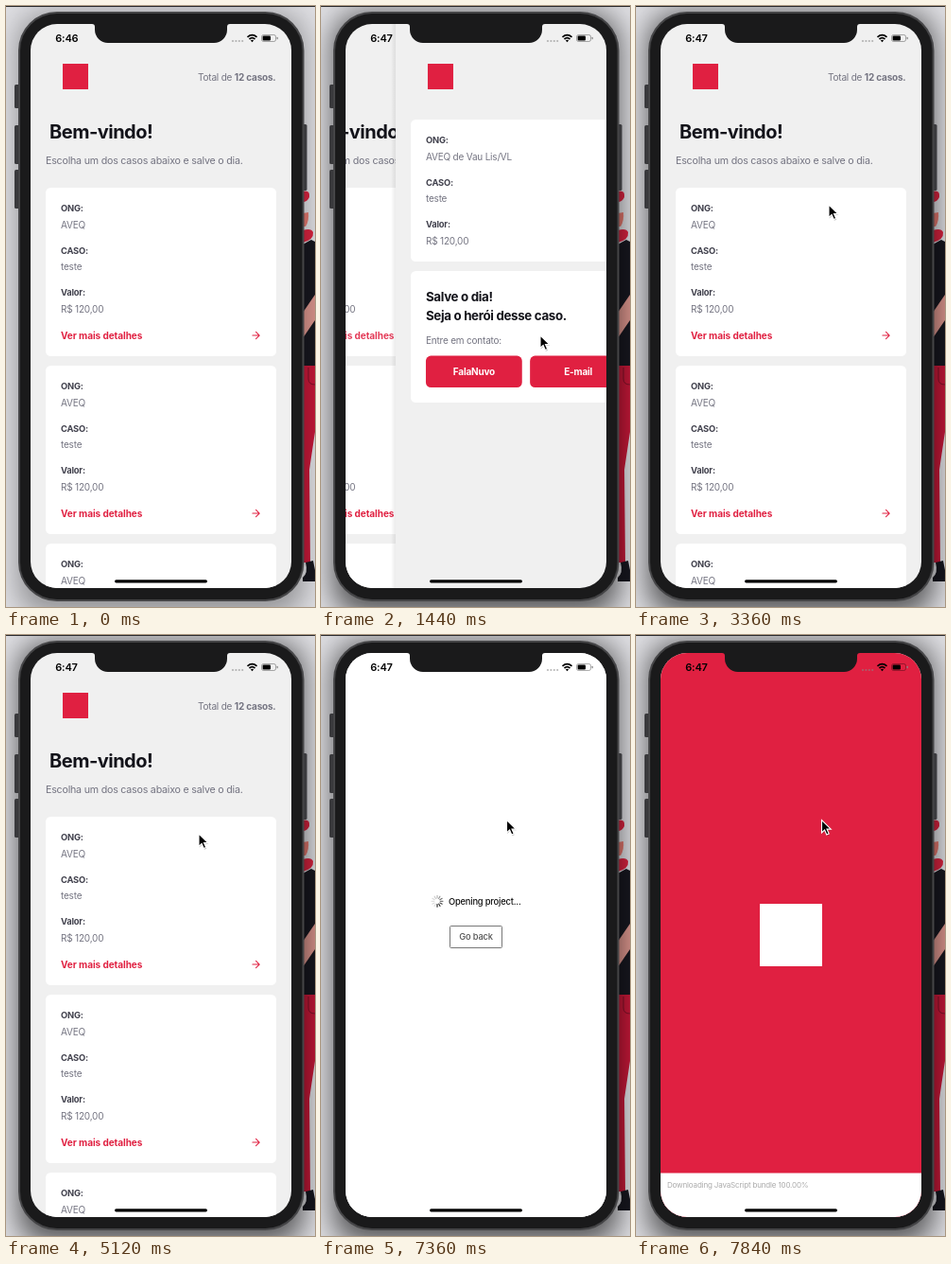
These frames come from a looping animation (327x635 px, 8000 ms). An HTML page:

```html
<!DOCTYPE html>
<html lang="pt-BR">
<head>
<meta charset="utf-8">
<title>Casos</title>
<style>
  html, body { margin: 0; width: 100%; height: 100%; overflow: hidden; background: #dedee2; }
  svg { display: block; }
  text { font-family: Inter, "Liberation Sans", sans-serif; letter-spacing: -.02em; }
  .b { font-weight: 700; }
  .big { letter-spacing: -.025em; }
  .link { letter-spacing: -.005em; }
  .line { fill: none; stroke: #e02041; stroke-linecap: round; stroke-linejoin: round; stroke-width: 2; }
</style>
</head>
<body>
<svg id="stage" width="327" height="635" viewBox="0 0 327 635"></svg>
<script>
const RED = '#e02041', GREY = '#737380', INK = '#41414d', DARK = '#13131a', BG = '#f0f0f0';
const ARROW = 'M5 12h14M12 5l7 7-7 7';
const W = 276, LOOP = 8000, STEP = 160;

const rect = (x, y, w, h, fill, r = 0, more = '') =>
  `<rect x="${x}" y="${y}" width="${w}" height="${h}" rx="${r}" fill="${fill}" ${more}/>`;
const text = (x, y, size, fill, str, more = '') =>
  `<text x="${x}" y="${y}" font-size="${size}" fill="${fill}" ${more}>${str}</text>`;
const bold = (x, y, size, fill, str, kind = '', more = '') =>
  text(x, y, size, fill, str, `class="b ${kind}" ${more}`);
const MID = 'text-anchor="middle"';

const fields = (y, ngo) => [['ONG:', ngo], ['CASO:', 'teste'], ['Valor:', 'R$ 120,00']]
  .map(([label, value], i) =>
    bold(58, y + 25 + i * 44.5, 9.33, INK, label) +
    text(58, y + 42.5 + i * 44.5, 10, GREY, value)).join('');

const card = (y, id) => rect(42, y, 244, 178, '#fff', 5.3) + fields(y, 'AVEQ') +
  `<g id="${id}">` + bold(58, y + 159.5, 10, RED, 'Ver mais detalhes', 'link') +
  `<path class="line" d="${ARROW}" transform="translate(258.3 ${y + 149.8}) scale(.52)"/></g>`;

const logo = rect(60, 61, 27, 27, RED);

const home = rect(26, 19, W, 596, BG) + logo +
  text(285.5, 78.5, 10, GREY, 'Total de <tspan class="b">12 casos.</tspan>', 'text-anchor="end"') +
  bold(46, 139.5, 20, DARK, 'Bem-vindo!', 'big') +
  text(42, 167, 10.67, GREY, 'Escolha um dos casos abaixo e salve o dia.') +
  [192, 380, 568].map((y, i) => card(y, 'more' + i)).join('');

const button = (x, label) =>
  rect(x, 369.6, 101.8, 33.4, RED, 5.3) + bold(x + 51, 390, 10, '#fff', label, '', MID);

const detail = rect(21, 19, 5, 596, 'url(#edge)') + rect(26, 19, W, 596, BG) + logo +
  `<path id="back" class="line" d="${ARROW}" transform="translate(287 85) rotate(180) scale(.84)"/>` +
  rect(42, 120, 244, 150, '#fff', 5.3) + fields(120, 'AVEQ de Vau Lis/VL') +
  rect(42, 280, 244, 139, '#fff', 5.3) +
  bold(58, 311.5, 13.33, DARK, 'Salve o dia!', 'big') +
  bold(58, 331.5, 13.33, DARK, 'Seja o herói desse caso.', 'big') +
  text(58, 356.5, 10, GREY, 'Entre em contato:') +
  button(58, 'FalaNuvo') + button(168.2, 'E-mail');

const spokes = Array.from({ length: 12 }, (_, i) =>
  `<path class="spoke" d="M0-3.2v-2.8" stroke="#000" stroke-width="1" stroke-linecap="round" transform="rotate(${i * 30})"/>`).join('');

const opening = rect(26, 19, W, 596, '#fff') +
  `<g transform="translate(123 281.3)">${spokes}</g>` +
  text(135, 284.8, 9.33, '#111', 'Opening project...', 'font-weight="500"') +
  rect(136.5, 307.5, 55, 23, '#fff', 1, 'stroke="#777"') +
  text(164, 322.3, 9.33, '#555', 'Go back', 'font-weight="500" ' + MID);

const splash = rect(26, 19, W, 596, RED) + rect(131, 284, 66, 66, '#fff') +
  '<g id="bundle">' + rect(26, 568.5, W, 47, '#fff') +
  text(33, 583.5, 8, '#aaa', 'Downloading JavaScript bundle 100.00%') + '</g>';

const person = `
  <path d="M314 196q8-2 7 6-2 5-7 5zM314 237q9-3 11 2 1 8-11 11z" fill="#d8233f"/>
  <path d="M314 219l6-1q1 9-3 15h-3z" fill="#e2786f"/>
  <path d="M314 252l9-5 4 2v132h-13z" fill="#17171f"/>
  <path d="M314 324l13-19v27l-13 19z" fill="#d9948c"/>
  <path d="M314 380h13v70l-6 40 1 98h-8z" fill="#c41838"/>
  <path d="M320 382v12q0 6 7 6" fill="none" stroke="#7d1027"/>
  <path d="M317 588l8-2 2 10v12h-13v-4q6-5 3-16z" fill="#17171f"/>`;

const phone = [[9, 83, 25], [9, 126, 41], [9, 173, 41], [312.5, 125, 70]]
  .map(([x, y, h]) => rect(x, y, 6, h, '#39393c', 1.5)).join('') +
  rect(13, 6, 302.5, 623, '#454547', 41) + rect(15, 8, 298.5, 619, '#1a1a1b', 39);

const status =
  '<path d="M91 18v1q3 0 3 3v3a14 14 0 0 0 14 14h112a14 14 0 0 0 14-14v-3q0-3 3-3v-1z" fill="#1a1a1b"/>' +
  text(52.3, 38, 11, '#000', '', 'id="clock" font-weight="600"') +
  [240, 243.4, 246.8, 250.2].map(x => `<circle cx="${x}" cy="37" r="1.1" fill="#888" opacity=".6"/>`).join('') +
  `<g fill="none" stroke="#000" stroke-width="1.7">
    <path d="M255.5 32.8q5-4.4 10 0M257.5 35q3-2.6 6 0"/></g>
   <path d="M258.9 36.4q1.6-1.3 3.2 0l-1.6 1.8z"/>` +
  rect(270.5, 30.5, 15, 7, 'none', 2, 'stroke="#000" stroke-opacity=".4" stroke-width=".8"') +
  rect(271.6, 31.6, 8.4, 4.8, '#000', 1) + rect(286.6, 32.7, 1.2, 2.6, '#888', .6) +
  rect(115, 606.2, 98, 3.2, '#000', 1.6);

const TIP = 'M0 0v13.4l3.1-2.9 2.2 5 2.4-1-2.2-4.9h4.3z';

stage.innerHTML = `
  <defs>
    <clipPath id="screen">${rect(26, 19, W, 596, '#000', 28)}</clipPath>
    <linearGradient id="edge"><stop stop-opacity="0"/><stop offset="1" stop-opacity=".08"/></linearGradient>
    <filter id="soft" x="-20%" y="-20%" width="140%" height="140%"><feGaussianBlur stdDeviation="15"/></filter>
  </defs>
  ${rect(0, 0, 327, 635, '#dedee2')}${person}
  ${rect(13, 8, 302, 635, '#000', 30, 'id="shade" filter="url(#soft)"')}
  ${rect(0, 0, 327, 1, '#2b2b2e')}${phone}
  <g clip-path="url(#screen)">
    <g id="home">${home}</g><g id="detail">${detail}</g>
    <g id="opening">${opening}</g><g id="splash">${splash}</g>
  </g>
  ${status}
  <g id="pointer">
    <path d="${TIP}" transform="translate(.6 1.2)" opacity=".25"/>
    <path d="${TIP}" stroke="#fff" stroke-width="1.1"/>
  </g>`;

const $ = id => document.getElementById(id);
const show = (id, on) => $(id).setAttribute('display', on ? 'inline' : 'none');
const move = (id, x, y = 0) => $(id).setAttribute('transform', `translate(${x} ${y})`);
const clamp = v => Math.min(1, Math.max(0, v));
const ease = p => p * p * (3 - 2 * p);

// critically damped spring, 0 to 1
const spring = ms => {
  const u = Math.max(0, ms) * .01826, p = 1 - (1 + u) * Math.exp(-u);
  return p > .973 ? 1 : p;
};
// touch feedback: fade to 20 %, then recover
const touch = (t, down, up) => 1 - .8 * clamp((t - down) / 120) * (1 - ease(clamp((t - up) / 250)));

const path = [[160, 300, 300], [320, 232, 348], [1600, 232, 348], [2400, 276, 79], [2720, 276, 79],
  [3360, 204, 210], [5600, 204, 210], [5920, 196.5, 195.5], [LOOP, 196.5, 195.5]];

function pointerAt(t) {
  const i = Math.max(1, path.findIndex(k => k[0] > t));
  const [t0, x0, y0] = path[i - 1], [t1, x1, y1] = path[i];
  const p = ease(clamp((t - t0) / (t1 - t0)));
  return [x0 + (x1 - x0) * p, y0 + (y1 - y0) * p];
}

function draw(t) {
  const open = spring(t - 1273) - spring(t - 2690);
  move('home', -.3 * W * open);
  move('detail', W * (1 - open));
  show('detail', open > 0);
  $('more0').setAttribute('opacity', touch(t, 1000, 1250));
  $('back').setAttribute('opacity', touch(t, 2420, 2640));

  show('opening', t >= 6560 && t < 7520);
  show('splash', t >= 7520);
  show('bundle', t >= 7680);
  const turn = Math.floor((t - 7360) / 1000 * 12) + 6;
  document.querySelectorAll('.spoke').forEach((s, i) =>
    s.setAttribute('opacity', Math.max(.15, 1 - ((turn - i + 240) % 12) * .11)));

  $('clock').textContent = t < 640 ? '6:46' : '6:47';
  $('shade').setAttribute('opacity', t < 640 ? .35 : .62);
  show('pointer', t >= 160);
  move('pointer', ...pointerAt(t));
}

function frame() {
  draw(Math.floor(performance.now() % LOOP / STEP) * STEP);
  requestAnimationFrame(frame);
}
frame();
</script>
</body>
</html>
```
